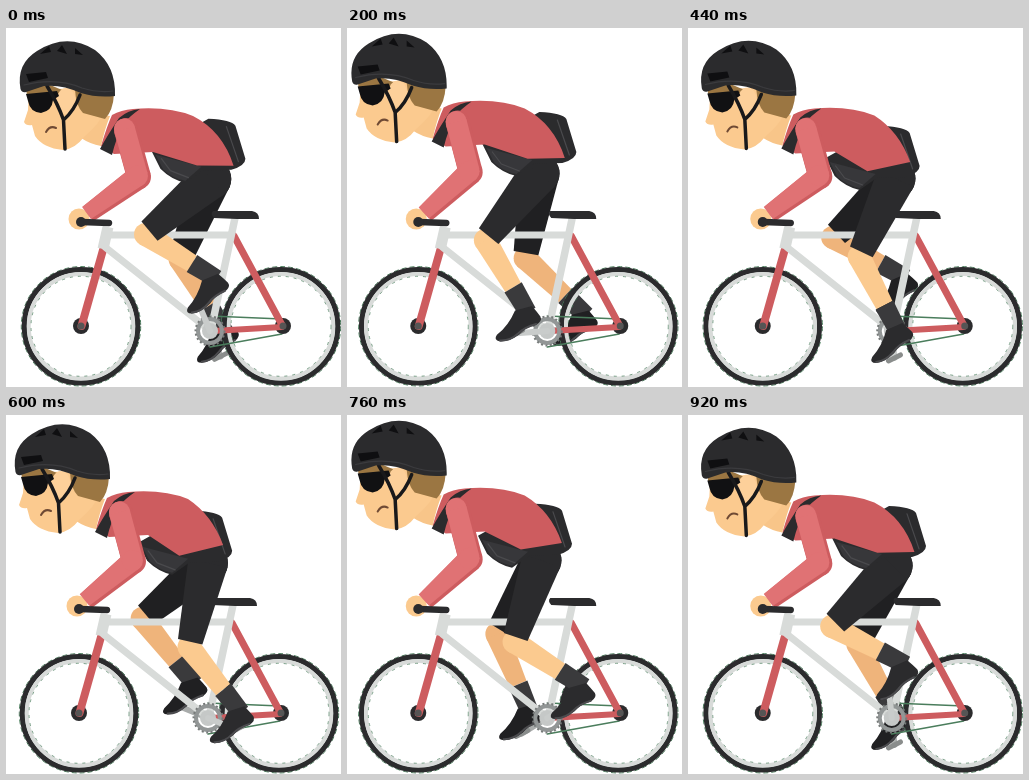
Write an HTML page with a canvas that moves like this. It is 335x359 px and loops after 960 ms.

```html
<!DOCTYPE html>
<html lang="en">
<head>
<meta charset="utf-8">
<title>Cyclist</title>
<style>
html, body { margin: 0; width: 100%; height: 100%; overflow: hidden; background: #fff; }
canvas { display: block; }
</style>
</head>
<body>
<canvas id="stage" width="335" height="359"></canvas>
<script>
const ctx = document.getElementById('stage').getContext('2d');
const LOOP = 960, STEP = 40, TAU = Math.PI * 2, DEG = TAU / 360;
const THIGH = 86, SHIN = 76;
const black = '#2b2b2d', dark = '#202022', steel = '#d8dbd9', red = '#cd5c5f',
  sleeve = '#e07274', skin = '#fbca8f', farSkin = '#efb47b', sock = '#3a3a3c', fringe = '#4a7d5c';

const shape = (d, color) => { ctx.fillStyle = color; ctx.fill(new Path2D(d)); };

function line(d, color, width, cap = 'round') {
  ctx.strokeStyle = color;
  ctx.lineWidth = width;
  ctx.lineCap = cap;
  ctx.lineJoin = 'round';
  ctx.stroke(new Path2D(d));
}

function disc(x, y, r, color) {
  ctx.fillStyle = color;
  ctx.beginPath();
  ctx.arc(x, y, r, 0, TAU);
  ctx.fill();
}

function ring(x, y, r, color, width, dash = []) {
  ctx.strokeStyle = color;
  ctx.lineWidth = width;
  ctx.lineCap = 'butt';
  ctx.setLineDash(dash);
  ctx.beginPath();
  ctx.arc(x, y, r, 0, TAU);
  ctx.stroke();
  ctx.setLineDash([]);
}

function shifted(x, y, draw) {
  ctx.save();
  ctx.translate(x, y);
  draw();
  ctx.restore();
}

const mix = (a, b, k) => ({ x: a.x + (b.x - a.x) * k, y: a.y + (b.y - a.y) * k });

// Tapered segment between two points with half widths ra and rb
function limb(a, b, ra, rb, color) {
  const len = Math.hypot(b.x - a.x, b.y - a.y);
  const nx = (a.y - b.y) / len, ny = (b.x - a.x) / len;
  ctx.fillStyle = color;
  ctx.beginPath();
  ctx.moveTo(a.x + nx * ra, a.y + ny * ra);
  ctx.lineTo(b.x + nx * rb, b.y + ny * rb);
  ctx.lineTo(b.x - nx * rb, b.y - ny * rb);
  ctx.lineTo(a.x - nx * ra, a.y - ny * ra);
  ctx.fill();
}

// Knee bends forward, to the left of the hip-ankle line
function kneeOf(hip, ankle) {
  const dx = ankle.x - hip.x, dy = ankle.y - hip.y, d = Math.hypot(dx, dy);
  const along = (THIGH ** 2 - SHIN ** 2 + d * d) / (2 * d);
  const out = Math.sqrt(Math.max(0, THIGH ** 2 - along ** 2));
  return { x: hip.x + (dx * along - dy * out) / d, y: hip.y + (dy * along + dx * out) / d };
}

function leg(hip, angle, bikeX, flesh, cloth) {
  // The heel drops and the foot flattens mid-stroke
  const drop = Math.sin(angle) ** 2;
  const ankle = {
    x: 209 + bikeX - 28.5 * Math.sin(angle),
    y: 271 - 25 * Math.cos(angle) + 9 * drop
  };
  const knee = kneeOf(hip, ankle);
  const sockTop = mix(knee, ankle, 0.72);
  disc(knee.x, knee.y, 11.5, flesh);
  limb(knee, sockTop, 11.5, 9, flesh);
  limb(sockTop, mix(knee, ankle, 1.1), 10, 9, sock);
  disc(hip.x, hip.y, 20, cloth);
  limb(hip, mix(hip, knee, 0.94), 20, 12.5, cloth);
  shifted(ankle.x, ankle.y, () => {
    ctx.rotate(0.16 * drop);
    shape('M-8 6L8 -1Q14 4 18 8Q21 12 15 17Q5 21 0 29Q-9 38 -18 39Q-25 39 -22 33Q-12 22 -8 6Z', cloth);
    line('M-18 38Q-8 37 -1 28Q4 21 15 16', '#4b4b4e', 2);
  });
}

function crank(angle, color) {
  const x = 204 - 31 * Math.sin(angle), y = 303 - 27 * Math.cos(angle);
  line(`M204 303L${x} ${y}`, color, 6);
  line(`M${x - 6} ${y + 3}L${x + 6} ${y - 3}`, '#8a8d8c', 5);
}

function wheel(x) {
  ring(x, 298.3, 59.7, fringe, 1, [5, 3]);
  ring(x, 298.3, 56.7, black, 5.2);
  ring(x, 298.3, 52.3, steel, 4);
  ring(x, 298.3, 50, fringe, 0.7, [3, 5]);
}

function bike() {
  wheel(75);
  wheel(275);
  line('M204 288L276 291M204 319L276 306', fringe, 1.5);
  disc(75, 298, 8, black);
  disc(277, 298, 8, black);
  line('M97 222L75.5 298', red, 8);
  line('M228 208L276 297', red, 7);
  line('M206 303L276 299', red, 6);
  disc(75, 298, 3.5, '#555');
  disc(277, 298, 3.5, '#555');
  line('M100 207H224', steel, 7);
  line('M99 219L202 301', steel, 7);
  line('M229 190L205 302', steel, 7.5);
  line('M102 199L97 221', steel, 11, 'butt');
  shape('M207 183H246Q253 184 253 191H231L208 190Q204 186 207 183Z', black);
}

function chainring() {
  ring(204, 303, 12, '#929696', 4);
  ring(204, 303, 14.5, '#777b7a', 2, [2, 2.5]);
  disc(204, 303, 8, '#c5c8c7');
}

function bag() {
  shape('M146 122L155 140Q166 151 180 154L197 142L226 141Q240 137 240 130L230 97Q226 91 203 90Z', black);
  shape('M150 126L158 141Q168 150 180 152L196 138Z', '#37373a');
  line('M156 130L165 142L183 149M221 98L233 133', '#4a4a4d', 1.2);
}

// The waist dips and draws forward as the pelvis rocks
function torso(rock) {
  const belly = `${192 - 14 * rock} ${137 + 8 * rock}`;
  const waist = `${228 - 6 * rock} ${138 - 4 * rock}`;
  shape(`M95 118Q101 98 106 87Q115 82 127 81Q162 78 187 88Q${217 - 6 * rock} ${103 + rock} ${waist}
    L${belly}L147 124L108 126Z`, red);
  shape('M94 121Q101 108 113 90Q122 82 134 81Q124 88 118 95Q110 110 106 127Z', black);
}

function head() {
  shape('M72 82L104 88Q99 100 95 118Q84 116 75 110Z', '#f8c589');
  shape('M23 62L22 82L18 94Q20 98 26 97L29 108Q37 120 57 122Q69 121 78 109Q94 96 101 79L76 60Z', skin);
  shape('M69 62L108 66Q107 83 99 91L77 85Q70 78 69 62Z', '#9b7642');
  shape('M20 60L42 56L56 62L52 66L21 68Z', '#9b7642');
  ctx.save();
  ctx.translate(60, 73);
  ctx.scale(0.72, 1);
  disc(0, 0, 13, '#fdd09a');
  ctx.restore();
  shape('M20 66L51 63L53 68L47 72Q46 83 35 85Q24 84 22 73Z', '#111113');
  line('M40 104Q44 97 50 100', '#6f4a34', 2);
  line('M41 58Q52 76 57.5 92L59 121M74 67Q68 83 57.5 92', '#19191b', 3.5);
  shape('M14.5 61Q10 36 31 23Q61 4 89 22Q110 38 109 68Q91 70 75 65Q55 56 38 58L20 64Q16 65 14.5 61Z', black);
  shape('M20 46L40 44L42 50L23 54ZM34 26L43 18L45 24ZM51 23L56 17L61 26ZM69 20L77 27L69 26Z', '#0f0f11');
  line('M18 57Q50 49 76 60Q92 65 107 63', '#3b3b3e', 1.2);
}

function sleeveShape(shoulder, elbow, wrist, r, color) {
  limb(elbow, wrist, r, r - 3, color);
  disc(shoulder.x, shoulder.y, r, color);
  limb(shoulder, elbow, r, r, color);
  disc(elbow.x, elbow.y, r, color);
}

function arm(sway) {
  const shoulder = { x: 120 + 5 * sway, y: 102 + 4 * sway };
  const elbow = { x: 133 + 5 * sway, y: 149 + 2.5 * sway };
  const wrist = { x: 82 + 2 * sway, y: 186 };
  disc(73 + 2 * sway, 191, 10.5, skin);
  sleeveShape(shoulder, elbow, wrist, 12, red);
  shifted(-1.5, -1, () => sleeveShape(shoulder, elbow, wrist, 10.5, sleeve));
}

function draw(time) {
  const turn = time / LOOP * TAU;
  const sway = Math.cos(turn * 2) - 1;
  const rock = 0.5 - 0.5 * Math.cos(turn - 30 * DEG);
  const bikeX = 2 * sway;
  const near = turn + 10 * DEG, far = near + TAU / 2, lead = 10 * DEG;
  const hip = { x: 205 + 7 * sway + 4 * rock, y: 151 + 3 * sway };

  ctx.clearRect(0, 0, 335, 359);
  shifted(bikeX, 0, () => crank(far + lead, '#a9acab'));
  leg(hip, far, bikeX, farSkin, dark);
  shifted(bikeX, 0, () => {
    bike();
    chainring();
    crank(near + lead, '#c9cccb');
  });
  leg(hip, near, bikeX, skin, black);
  shifted(5 * sway - 9 * rock, 4 * sway + 10 * rock, bag);
  shifted(5 * sway, 4 * sway, () => {
    torso(rock);
    head();
  });
  arm(sway);
  shifted(bikeX, 0, () => {
    line('M76 194L103 195', black, 6.5);
    disc(75, 194, 5, black);
  });
}

function frame() {
  draw(Math.floor(performance.now() % LOOP / STEP) * STEP);
  requestAnimationFrame(frame);
}
frame();
</script>
</body>
</html>
```
